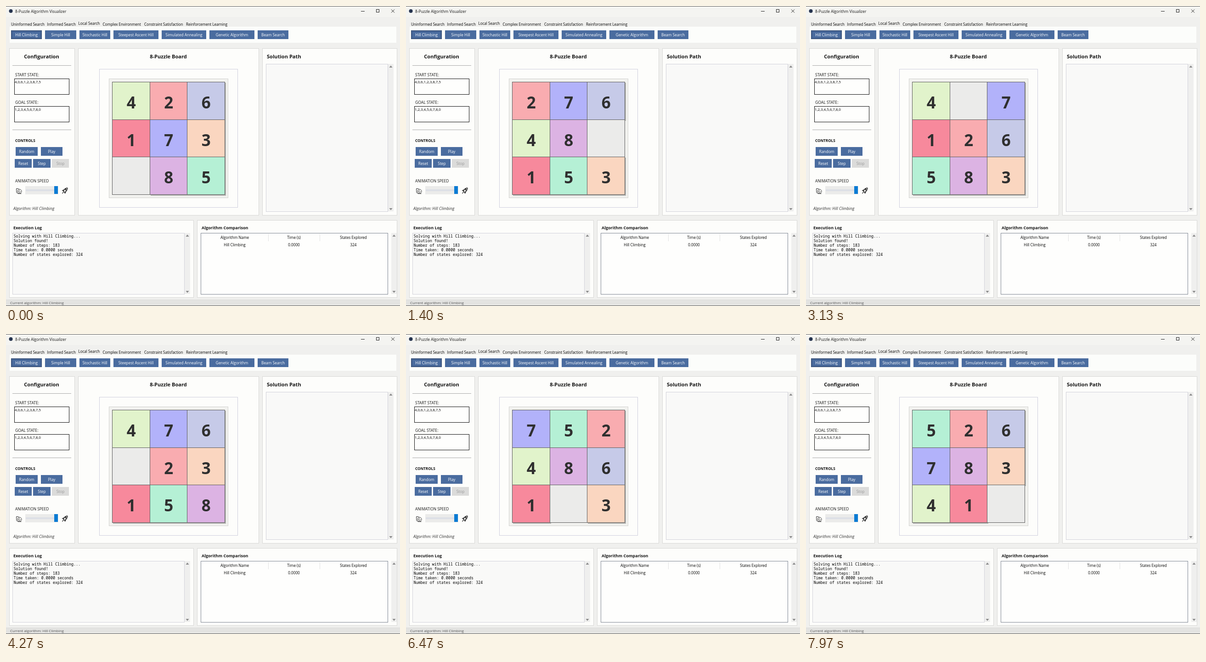
An HTML page with a canvas that plays this animation: 858 px wide and 653 px high, repeating every 8000 ms.

```html
<!DOCTYPE html>
<html lang="en">
<head>
<meta charset="utf-8">
<title>8-Puzzle Algorithm Visualizer</title>
<style>
html, body { margin: 0; width: 100%; height: 100%; overflow: hidden; background: #f0f0ee; }
canvas { display: block; }
</style>
</head>
<body>
<canvas id="stage" width="858" height="653"></canvas>
<script>
const ctx = document.getElementById('stage').getContext('2d');
const SANS = '"Open Sans", "Noto Sans", sans-serif';
const MONO = '"Noto Sans Mono", "DejaVu Sans Mono", monospace';
const LOOP = 8000;
const BLUE = '#4a6c9f';
const COLORS = ['#ebebea', '#f7899c', '#f9acb0', '#fad6c0', '#e1f3cb', '#b5f0d5', '#c6cae8', '#b2b2fa', '#dcb3e3'];

// Hill climbing: best unvisited neighbour, ties in the order up, down, left, right.
const cost = s => s.reduce((sum, v, i) => v
  ? sum + Math.abs((i % 3) - (v - 1) % 3) + Math.abs(Math.floor(i / 3) - Math.floor((v - 1) / 3))
  : sum, 0);

function neighbours(s) {
  const b = s.indexOf(0), x = b % 3, y = Math.floor(b / 3);
  return [[0, -1], [0, 1], [-1, 0], [1, 0]]
    .filter(([dx, dy]) => x + dx >= 0 && x + dx < 3 && y + dy >= 0 && y + dy < 3)
    .map(([dx, dy]) => {
      const n = s.slice(), t = b + dx + dy * 3;
      n[b] = n[t];
      n[t] = 0;
      return n;
    });
}

function climb(start, steps) {
  const path = [start], seen = new Set([start.join()]);
  while (path.length <= steps) {
    const free = neighbours(path[path.length - 1]).filter(n => !seen.has(n.join()));
    if (!free.length) break;
    const next = free.reduce((a, b) => cost(b) < cost(a) ? b : a);
    seen.add(next.join());
    path.push(next);
  }
  return path;
}

const path = climb([4, 0, 6, 1, 2, 3, 8, 7, 5], 42).slice(3);

// The pace slackens slightly towards the end.
const stepAt = t => t < 5394 ? Math.floor((t + 114) / 204) : 27 + Math.floor((t - 5394) / 217);

function fill(x, y, w, h, color) {
  ctx.fillStyle = color;
  ctx.fillRect(x, y, w, h);
}

function box(x, y, x2, y2, color, border) {
  fill(x, y, x2 - x + 1, y2 - y + 1, color);
  ctx.lineWidth = 1;
  ctx.strokeStyle = border;
  ctx.strokeRect(x + 0.5, y + 0.5, x2 - x, y2 - y);
}

function text(str, x, y, size, { color = '#151515', style = '', align = 'left', font = SANS } = {}) {
  ctx.font = `${style} ${size}px ${font}`;
  ctx.fillStyle = color;
  ctx.textAlign = align;
  ctx.fillText(str, x, y);
}

function line(points, color, width = 1) {
  ctx.strokeStyle = color;
  ctx.lineWidth = width;
  ctx.beginPath();
  points.forEach(([x, y]) => ctx.lineTo(x, y));
  ctx.stroke();
}

function button(label, x, x2, y, color = BLUE, ink = '#fff') {
  fill(x, y, x2 - x, 19, color);
  text(label, (x + x2) / 2, y + 12.5, 8.4, { color: ink, align: 'center' });
}

function arrow(x, y, dir) {
  ctx.fillStyle = '#8b8b8b';
  ctx.beginPath();
  ctx.moveTo(x - 3.5, y + 2 * dir);
  ctx.lineTo(x + 3.5, y + 2 * dir);
  ctx.lineTo(x, y - 2.5 * dir);
  ctx.fill();
}

function scrollbar(x, y, y2) {
  fill(x, y, 12, y2 - y, '#efefee');
  arrow(x + 6, y + 6, 1);
  arrow(x + 6, y2 - 5, -1);
}

function windowFrame() {
  fill(0, 0, 858, 653, '#f0f0ee');
  fill(0, 0, 858, 24, '#f4f4f1');
  ctx.fillStyle = '#26344f';
  ctx.beginPath();
  ctx.arc(10.5, 11, 4, 0, 7);
  ctx.fill();
  text('8-Puzzle Algorithm Visualizer', 20, 14.5, 8.3);
  line([[773, 11.5], [781, 11.5]], '#222');
  ctx.strokeRect(806.5, 7.5, 6, 6);
  line([[839, 7.5], [846, 14.5]], '#222');
  line([[846, 7.5], [839, 14.5]], '#222');

  [['Uninformed Search', 11], ['Informed Search', 89.5], ['Local Search', 157.5], ['Complex Environment', 210.5],
    ['Constraint Satisfaction', 301], ['Reinforcement Learning', 392]]
    .forEach(([label, x], i) => text(label, x, i === 2 ? 41 : 42.5, 8.05, { color: '#000' }));
  fill(8, 45, 842, 35, '#fcfdfb');
  [['Hill Climbing', 11, 78], ['Simple Hill', 85, 153], ['Stochastic Hill', 160, 227], ['Steepest Ascent Hill', 234, 332],
    ['Simulated Annealing', 339, 436], ['Genetic Algorithm', 443, 541], ['Beam Search', 548, 615]]
    .forEach(([label, x, x2]) => button(label, x, x2, 53));
  ctx.strokeStyle = '#2c4166';
  ctx.lineWidth = 1;
  ctx.strokeRect(11.5, 53.5, 66, 18);
  ctx.setLineDash([1, 1]);
  ctx.strokeRect(13.5, 55.5, 62, 14);
  ctx.setLineDash([]);
}

function snail() {
  ctx.strokeStyle = '#333';
  ctx.lineWidth = 1;
  ctx.beginPath();
  ctx.arc(29.5, 403.5, 4.5, 0, 7);
  ctx.moveTo(31.5, 403.5);
  ctx.arc(29.5, 403.5, 2, 0, 5);
  ctx.stroke();
  line([[22.5, 397.5], [23, 406], [26, 408.5], [33.5, 408.5]], '#333');
  line([[22.5, 397.5], [27, 397.5], [28, 399]], '#333');
}

function rocket() {
  ctx.strokeStyle = '#222';
  ctx.lineWidth = 1.3;
  ctx.beginPath();
  ctx.moveTo(134, 396);
  ctx.quadraticCurveTo(128, 396, 125, 403);
  ctx.lineTo(127.5, 405.5);
  ctx.quadraticCurveTo(134, 402, 134, 396);
  ctx.stroke();
  ctx.beginPath();
  ctx.arc(130.3, 399.7, 1.2, 0, 7);
  ctx.stroke();
  line([[127, 399.5], [123, 401.5], [125, 403]], '#222', 1.3);
  line([[131, 403], [128.5, 407.5], [127.5, 405.5]], '#222', 1.3);
  line([[122.5, 408], [125.5, 405]], '#222', 1.3);
}

function configuration() {
  text('Configuration', 77.5, 114, 11.15, { style: 'bold', align: 'center' });
  line([[14, 129.5], [142, 129.5]], '#a9a9a9');
  text('START STATE:', 20, 152.5, 8.6);
  box(18, 158, 137, 192, '#fefefd', '#111');
  text('4,0,6,1,2,3,8,7,5', 19, 168, 8, { color: '#000' });
  text('GOAL STATE:', 20, 212.5, 8.6);
  box(18, 218, 137, 252, '#fefefd', '#111');
  text('1,2,3,4,5,6,7,8,0', 19, 228, 8, { color: '#000' });
  line([[14, 269.5], [142, 269.5]], '#a9a9a9');
  text('CONTROLS', 20, 295.5, 8.15, { style: 'bold' });
  button('Random', 21, 69, 307);
  button('Play', 76, 123, 307);
  button('Reset', 19, 56, 333);
  button('Step', 59, 97, 333);
  button('Stop', 100, 137, 333, '#dbdbda', '#9a9a9a');
  text('ANIMATION SPEED', 20, 383.5, 8.4);
  fill(42, 392, 72, 18, '#ebebea');
  fill(43, 399, 62, 4, '#dde0e6');
  fill(105, 392, 8, 17, '#0c7bd3');
  snail();
  rocket();
  text('Algorithm: Hill Climbing', 16, 443.5, 8.6, { style: 'italic', color: '#333' });
}

function panels() {
  [[7, 92, 149, 455], [157, 92, 550, 455], [558, 92, 851, 455], [7, 466, 408, 634], [416, 466, 851, 634]]
    .forEach(r => box(...r, '#fdfdfb', '#d8d8d6'));
  configuration();

  text('8-Puzzle Board', 353.5, 114, 11.1, { style: 'bold', align: 'center' });
  text('Solution Path', 568, 114, 11.1, { style: 'bold' });
  box(566, 126, 831, 447, '#f9f9f8', '#d2d2da');
  scrollbar(832, 126, 447);

  text('Execution Log', 16, 486, 9, { style: 'bold' });
  box(14, 494, 388, 627, '#f9f9f8', '#d2d2da');
  scrollbar(389, 494, 627);
  ['Solving with Hill Climbing...', 'Solution found!', 'Number of steps: 183',
    'Time taken: 0.0000 seconds', 'Number of states explored: 324']
    .forEach((s, i) => text(s, 16.5, 504 + i * 10, 8.38, { font: MONO, color: '#000' }));

  text('Algorithm Comparison', 426, 486, 9, { style: 'bold' });
  box(424, 494, 831, 627, '#fefefd', '#7f8794');
  scrollbar(839, 494, 627);
  [571.5, 683.5].forEach(x => line([[x, 496], [x, 512]], '#e2e2e2'));
  [['Algorithm Name', 'Hill Climbing', 498], ['Time (s)', '0.0000', 627], ['States Explored', '324', 756.5]]
    .forEach(([head, value, x]) => {
      text(head, x, 506.5, 8.15, { align: 'center', color: '#000' });
      text(value, x, 522.5, 8.15, { align: 'center', color: '#000' });
    });

  fill(0, 639, 858, 14, '#e3e3e1');
  line([[0, 639.5], [858, 639.5]], '#dcdcda');
  text('Current algorithm: Hill Climbing', 9, 649, 7.95, { color: '#555' });
  fill(0, 0, 858, 1, '#5a5a58');
  fill(0, 652, 858, 1, '#5a5a58');
}

function board(state) {
  const edge = (origin, i) => Math.round(origin + i * 245 / 3);
  box(203, 137, 504, 438, '#fdfdfb', '#d0d0de');
  box(224, 158, 483, 417, '#f2f2ef', '#d2d2d0');
  const cells = state.map((v, i) => {
    const col = i % 3, row = Math.floor(i / 3);
    return { v, x: edge(231, col), y: edge(165, row), x2: edge(231, col + 1), y2: edge(165, row + 1) };
  });
  cells.filter(c => c.v).forEach(({ x, y, x2, y2 }) => fill(x + 2, y + 2, x2 - x + 1, y2 - y + 1, '#b4b4b1'));
  cells.forEach(({ v, x, y, x2, y2 }) => {
    box(x, y, x2, y2, COLORS[v], '#5c5c5c');
    if (v) text(v, (x + x2) / 2 + 0.8, y + 58, 35, { style: 'bold', align: 'center', color: '#2f2f2f' });
  });
}

function draw(now) {
  windowFrame();
  panels();
  board(path[stepAt(now % LOOP)]);
  requestAnimationFrame(() => draw(performance.now() - start));
}

const start = performance.now();
draw(0);
</script>
</body>
</html>
```
